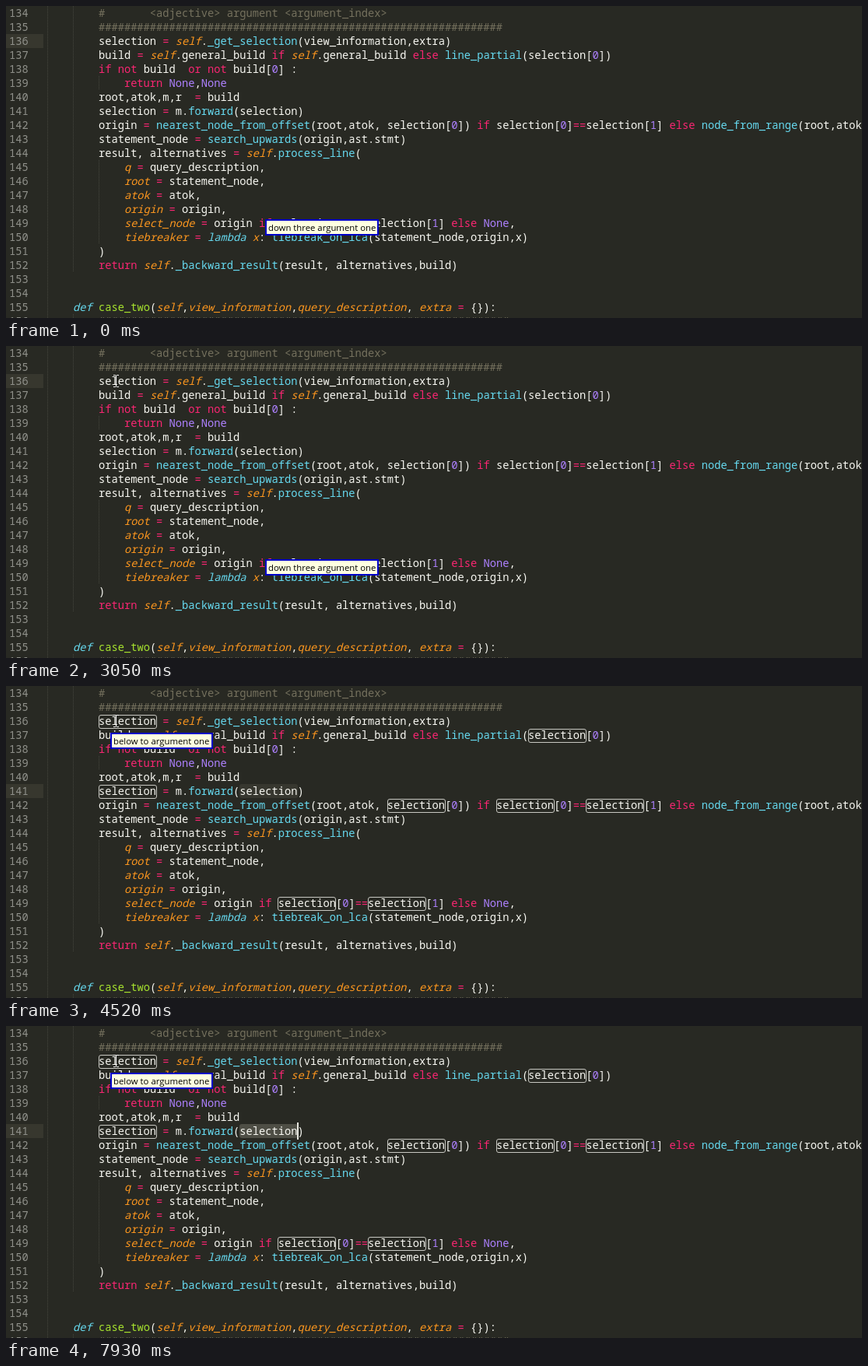
An HTML page for the animation above (8 s loop, 1100 px wide and 401 px high).

```html
<!DOCTYPE html>
<html lang="en">
<head>
<meta charset="utf-8">
<title>Code editor with voice commands</title>
<style>
  html, body { margin: 0; width: 100%; height: 100%; overflow: hidden; background: #282923; }
  #stage { position: relative; width: 1100px; height: 401px; overflow: hidden; background: #282923; color: #f8f8f2; }
  #stage div { position: absolute; box-sizing: border-box; }
  .row, .num { font: 500 13.745px/18px "Noto Sans Mono", "DejaVu Sans Mono", monospace; white-space: pre; height: 18px; font-variant-ligatures: none; }
  .num { left: 4px; color: #90918b; }
  .row { left: 53px; }
  .comment { color: #75715e; }
  .key { color: #f92672; }
  .const { color: #ae81ff; }
  .decl { color: #66d9ef; font-style: italic; }
  .call { color: #66d9ef; }
  .name { color: #a6e22e; }
  .param { color: #fd971f; font-style: italic; }
  .guide { width: 1px; height: 18px; background: repeating-linear-gradient(#45463e 0 1px, transparent 1px 2px); }
  .box { width: 75px; height: 18px; border: 1px solid #c8c8c2; border-radius: 3px; }
  .tip { height: 21px; padding: 0 2px; border: 2px solid #0000c8; background: #ffffe1; color: #000;
         font: 11.35px/17px "Open Sans", "Noto Sans", sans-serif; white-space: pre; }
  .caret { width: 2px; height: 22px; background: #f8f8f0; }
  .gutter { left: 0; width: 48px; height: 18px; background: #37372e; }
  .sel { width: 75px; height: 18px; border-radius: 3px; }
  .icon { left: 134px; top: 59px; width: 16px; height: 16px; background: #f4f4f4; }
  .mouse { left: 0; top: 0; width: 7px; height: 16px; }
  .mouse svg { display: block; }
</style>
</head>
<body>
<div id="stage"></div>
<script>
const LOOP = 8000, FIRST = 134, ROW = 18, LEFT = 53, CHAR = 8.247;

const code = [
  "        #       <adjective> argument <argument_index>",
  "        " + "#".repeat(63),
  "        selection = self._get_selection(view_information,extra)",
  "        build = self.general_build if self.general_build else line_partial(selection[0])",
  "        if not build  or not build[0] :",
  "            return None,None",
  "        root,atok,m,r  = build",
  "        selection = m.forward(selection)",
  "        origin = nearest_node_from_offset(root,atok, selection[0]) if selection[0]==selection[1] else node_from_range(root,atok,",
  "        statement_node = search_upwards(origin,ast.stmt)",
  "        result, alternatives = self.process_line(",
  "            q = query_description,",
  "            root = statement_node,",
  "            atok = atok,",
  "            origin = origin,",
  "            select_node = origin if selection[0]==selection[1] else None,",
  "            tiebreaker = lambda x: tiebreak_on_lca(statement_node,origin,x)",
  "        )",
  "        return self._backward_result(result, alternatives,build)",
  "",
  "",
  "    def case_two(self,view_information,query_description, extra = {}):",
  "        " + "#".repeat(64)
];

const stage = document.getElementById("stage");
const px = n => n + "px";
const lineTop = n => px((n - FIRST) * ROW);
const colLeft = col => px(Math.round(LEFT + col * CHAR - 0.4));
const clamp = v => Math.min(1, Math.max(0, v));

function add(className, style = {}, text = "") {
  const el = document.createElement("div");
  el.className = className;
  el.textContent = text;
  Object.assign(el.style, style);
  stage.append(el);
  return el;
}

function kindOf(word, before, after) {
  const isDef = /^\s*def /.test(before);
  if (/^(if|else|or|not|return|=+)$/.test(word)) return "key";
  if (/^(None|\d+)$/.test(word)) return "const";
  if (/^(def|lambda)$/.test(word)) return "decl";
  if (after[0] === "(") return isDef ? "name" : "call";
  if (isDef || word === "self" || /lambda $/.test(before)) return "param";
  return /^ {12}$/.test(before) && /^ =/.test(after) ? "param" : "";
}

function paint(line) {
  if (/^\s*#/.test(line)) return `<span class="comment">${line.replace(/</g, "&lt;")}</span>`;
  return line.replace(/\w+|=+/g, (word, at) => {
    const kind = kindOf(word, line.slice(0, at), line.slice(at + word.length));
    return kind ? `<span class="${kind}">${word}</span>` : word;
  });
}

const gutter = add("gutter");
const sel = add("sel", { left: colLeft(30), top: lineTop(141) });
const boxes = [];

code.forEach((line, i) => {
  const n = FIRST + i, top = lineTop(n), indent = line.search(/\S/);
  for (let col = 0; col === 0 || col < indent; col += 4) add("guide", { left: colLeft(col), top });
  add("num", { top }, n);
  add("row", { top }).innerHTML = paint(line);

  // outline every other place of the selected word
  for (const { index } of line.matchAll(/\bselection\b/g)) {
    if (n === 141 && index === 30) continue;
    boxes.push(add("box", { left: colLeft(index), top: px(i * ROW + 1) }));
  }
});

const caretA = add("caret", { left: "134px", top: "34px" });
const caretB = add("caret", { left: "374px", top: "124px" });
const tip = (left, top, width, text) => add("tip", { left: px(left), top: px(top), width: px(width) }, text);
const tipFar = tip(333, 274, 146, "down three argument one");
const tipOld = tip(134, 60, 146, "down three argument one");
const tipNew = tip(134, 60, 132, "below to argument one");
const icon = add("icon");
const mouse = add("mouse");
mouse.innerHTML = '<svg width="7" height="16"><path d="M0 .5H3M4 .5H7M3.5 1V15M0 15.5H3M4 15.5H7" stroke="#fff" fill="none"/></svg>';

const show = (el, on) => { el.style.visibility = on ? "visible" : "hidden"; };

// smooth caret blink, brightest at each peak
const blink = (t, peak, period) => clamp(0.2 + 2 * Math.cos((t - peak) / period * 2 * Math.PI));

function mouseAt(t) {
  if (t < 250) return [733, 215];
  const step = clamp(Math.floor((t - 482) / 78) / 7);
  const eased = 1 - (1 - step) ** 2;
  return [604 - 466 * eased, 143 - 106 * eased].map(Math.round);
}

function draw(t) {
  const moved = t >= 4520, settled = t >= 4750;

  const [x, y] = mouseAt(t);
  mouse.style.transform = `translate(${x}px, ${y}px)`;
  show(mouse, t >= 170);

  caretA.style.opacity = t > 1300 && !moved ? blink(t, 1670, 1065) : 0;
  caretB.style.opacity = settled ? blink(t, 6050, 1040) : 0;

  show(tipFar, t < 3130);
  show(icon, t >= 3430 && t < 3510);
  show(tipOld, t >= 3510 && t < 3660);
  show(tipNew, t >= 3890);

  boxes.forEach(b => show(b, moved));
  show(sel, moved);
  sel.style.background = settled ? "#4e4e45" : "#37372f";
  gutter.style.top = lineTop(moved ? 141 : 136);
}

function tick() {
  draw(performance.now() % LOOP);
  requestAnimationFrame(tick);
}
tick();
</script>
</body>
</html>
```
